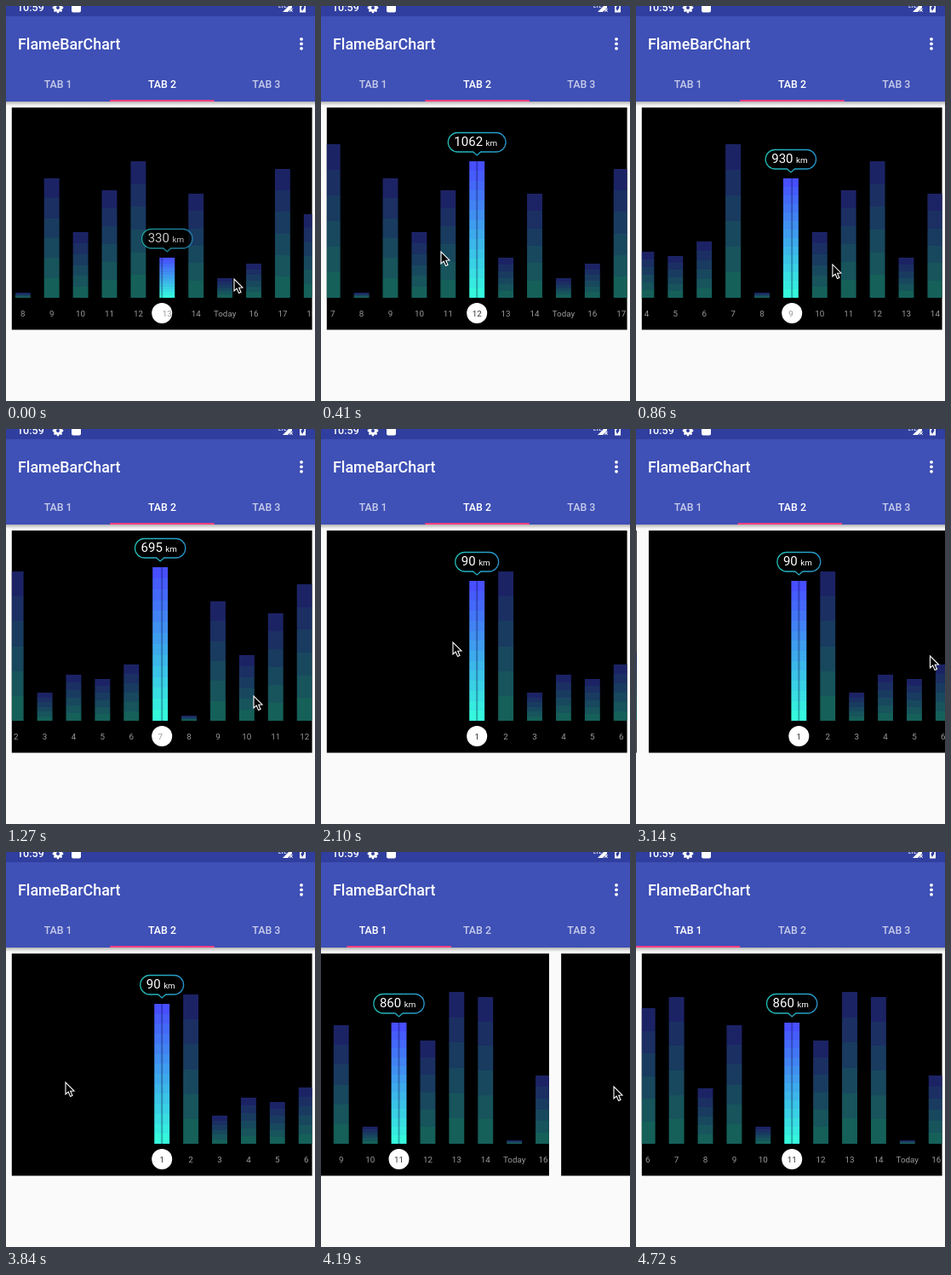
An HTML page with a canvas for the animation above (5.34 s loop, 363 by 463 pixels).

```html
<!DOCTYPE html>
<html lang="en">
<head>
<meta charset="utf-8">
<title>FlameBarChart</title>
<style>
html, body { margin: 0; width: 363px; height: 463px; overflow: hidden; background: #fafafa; }
canvas { display: block; }
</style>
</head>
<body>
<canvas id="stage" width="363" height="463"></canvas>
<script>
const g = document.getElementById('stage').getContext('2d');
const LOOP = 5340, PAGE = 367, TAB = PAGE / 3;
const MID = 183.2, STEP = 33.9, BAR = 17.9, BASE = 342, TODAY = 15;

// Chart data: bar heights from day `first` on, and known distances
const charts = [
  { first: 6, heights: [159, 172, 65, 139, 20, 142, 121, 178, 172, 4, 80], km: { 11: 860 } },
  { first: 1, heights: [164, 175, 33, 54, 49, 66, 180, 6, 140, 77, 126, 160, 47, 122, 23, 40, 151, 98],
    km: { 1: 90, 7: 695, 12: 1062, 13: 330 } }
];

const clamp = v => Math.max(0, Math.min(1, v));
const smooth = u => u * u * (3 - 2 * u);
const settle = u => 1 - (1 - u) ** 3;
const ramp = (t, start, end, ease = smooth) => ease(clamp((t - start) / (end - start)));

// Day in the middle of the second chart: one snap, then two flings
const scrollAt = t => 12.82 - .82 * ramp(t, 60, 360) - 4.94 * ramp(t, 640, 1030) - 6.06 * ramp(t, 1270, 1700);

// Pager shift: a swipe that falls back, then one that completes
const pagerAt = t => 215 * (ramp(t, 2670, 2780) - ramp(t, 2960, 3165)) + PAGE * ramp(t, 3880, 4720, settle);

// Pointer moves: start, end, destination
const moves = [
  [60, 410, 141, 288], [640, 1030, 291, 313], [1270, 1800, 155, 250], [2100, 2610, 372, 268],
  [3000, 3140, 345.5, 266], [3250, 3780, 70, 270], [3840, 4190, 344, 275], [4190, 4370, 372, 280]
];
const cursorAt = t => moves.reduce(([x, y], [start, end, toX, toY]) => {
  const u = ramp(t, start, end);
  return [x + (toX - x) * u, y + (toY - y) * u];
}, [268, 320]);

function rect(x, y, w, h, color) {
  g.fillStyle = color;
  g.fillRect(x, y, w, h);
}

function dot(x, y, r, color) {
  g.fillStyle = color;
  g.beginPath();
  g.arc(x, y, r, 0, 7);
  g.fill();
}

function poly(points, color) {
  g.beginPath();
  points.forEach(p => g.lineTo(...p));
  g.closePath();
  g.fillStyle = color;
  g.fill();
}

function text(s, x, y, size, color, align = 'left', weight = 400) {
  g.font = `${weight} ${size}px Roboto, sans-serif`;
  g.textAlign = align;
  g.fillStyle = color;
  g.fillText(s, x, y);
  return g.measureText(s).width;
}

function drawBar(x, height, active) {
  const bands = active ? 14 : 6, light = active ? 1 : .4;
  const edge = i => Math.round(BASE - height * (1 - i / bands));
  for (let i = 0; i < bands; i++) {
    const u = (i + .5) / bands;
    const rgb = [72 - 20 * u, 72 + 183 * u, 255 - 35 * u].map(v => Math.round(v * light));
    rect(x - BAR / 2, edge(i), BAR, edge(i + 1) - edge(i), `rgb(${rgb})`);
  }
}

function drawBubble(x, top, km, alpha) {
  g.font = '400 15px Roboto, sans-serif';
  const w = g.measureText(km).width + 34, l = x - w / 2, r = x + w / 2;
  const y = top - 33.5, b = y + 22.5, c = 11.25;
  const line = g.createLinearGradient(l, 0, r, 0);
  line.addColorStop(0, '#22c0b8');
  line.addColorStop(1, '#2894cc');
  g.globalAlpha = alpha;
  g.beginPath();
  g.arc(l + c, y + c, c, Math.PI / 2, Math.PI * 1.5);
  g.arc(r - c, y + c, c, -Math.PI / 2, Math.PI / 2);
  g.lineTo(x + 4.5, b);
  g.lineTo(x, b + 4);
  g.lineTo(x - 4.5, b);
  g.closePath();
  g.fillStyle = '#000';
  g.fill();
  g.lineWidth = 1.3;
  g.strokeStyle = line;
  g.stroke();
  const end = l + 7 + text(km, l + 7, top - 18, 15, '#fff');
  text('km', end + 3.5, top - 18, 9.8, '#fff');
  g.globalAlpha = 1;
}

function drawChart({ first, heights, km }, scroll, offset) {
  if (Math.abs(offset) >= PAGE) return;
  const chosen = Math.round(scroll), place = day => MID + (day - scroll) * STEP;
  g.save();
  g.translate(offset, 0);
  g.beginPath();
  g.rect(6.8, 119, 352.8, 260.5);
  g.clip();
  rect(0, 119, PAGE, 261, '#000');
  dot(MID, 360, 12, '#fff');
  heights.forEach((height, i) => {
    const day = first + i, centered = Math.abs(day - scroll) < .02;
    drawBar(place(day), height, day === chosen);
    text(day === TODAY ? 'Today' : day, place(day), 363.5, 9.8, centered ? '#333' : '#9a9a9a', 'center');
  });
  const x = place(chosen), height = heights[chosen - first];
  rect(MID - 1, BASE - height, 2, height, 'rgba(0,0,50,.3)');
  drawBubble(x, BASE - height, km[chosen] || Math.round(height * 6.64), clamp(1.2 - Math.abs(x - MID) * .07));
  g.restore();
}

function drawStatus() {
  rect(0, 0, 363, 12, '#303f9f');
  text('10:59', 13, 6, 12.5, '#fff', 'left', 500);
  for (let i = 0; i < 8; i++) {
    const a = i * Math.PI / 4;
    dot(61 + 5 * Math.cos(a), 2 + 5 * Math.sin(a), 1.4, '#fff');
  }
  dot(61, 2, 5, '#fff');
  dot(61, 2, 2, '#303f9f');
  g.beginPath();
  g.roundRect(77, -4, 11, 11.5, 2);
  g.fillStyle = '#fff';
  g.fill();
  text('LTE', 320, 2, 6, '#fff', 'left', 500);
  poly([[325, 7], [336, -4], [336, 2], [331, 7]], '#fff');
  text('×', 335, 8, 9, '#fff', 'center', 500);
  rect(345, -4, 7, 11.5, '#fff');
  poly([[349, -2], [346.5, 2.5], [348, 6], [350.7, 1.5]], '#303f9f');
}

function drawHeader(offset) {
  rect(0, 12, 363, 100, '#3f50b6');
  drawStatus();
  text('FlameBarChart', 14, 51, 17.9, '#fff', 'left', 500);
  for (let i = 0; i < 3; i++) {
    const chosen = i === (offset > PAGE / 2 ? 0 : 1);
    dot(347, 38.8 + 5.5 * i, 1.9, '#fff');
    text('TAB ' + (i + 1), TAB * (i + .5), 95.5, 12.4, chosen ? '#fff' : 'rgba(255,255,255,.7)', 'center', 500);
  }
  rect(TAB * (1 - offset / PAGE), 110, TAB, 2, '#ff4081');
  const shade = g.createLinearGradient(0, 112, 0, 117);
  shade.addColorStop(0, 'rgba(0,0,0,.28)');
  shade.addColorStop(1, 'rgba(0,0,0,0)');
  rect(0, 112, 363, 5, shade);
}

function drawCursor(x, y) {
  g.save();
  g.translate(x, y);
  poly([[0, 0], [0, 14], [3.2, 11.2], [5.6, 16.6], [8, 15.5], [5.7, 10.3], [10, 10]], '#000');
  g.lineWidth = 1.1;
  g.strokeStyle = '#fff';
  g.stroke();
  g.restore();
}

function draw(now) {
  const t = now % LOOP, offset = pagerAt(t);
  rect(0, 0, 363, 463, '#fafafa');
  drawChart(charts[0], 11, offset - PAGE);
  drawChart(charts[1], scrollAt(t), offset);
  drawHeader(offset);
  drawCursor(...cursorAt(t));
  requestAnimationFrame(draw);
}
requestAnimationFrame(draw);
</script>
</body>
</html>
```
